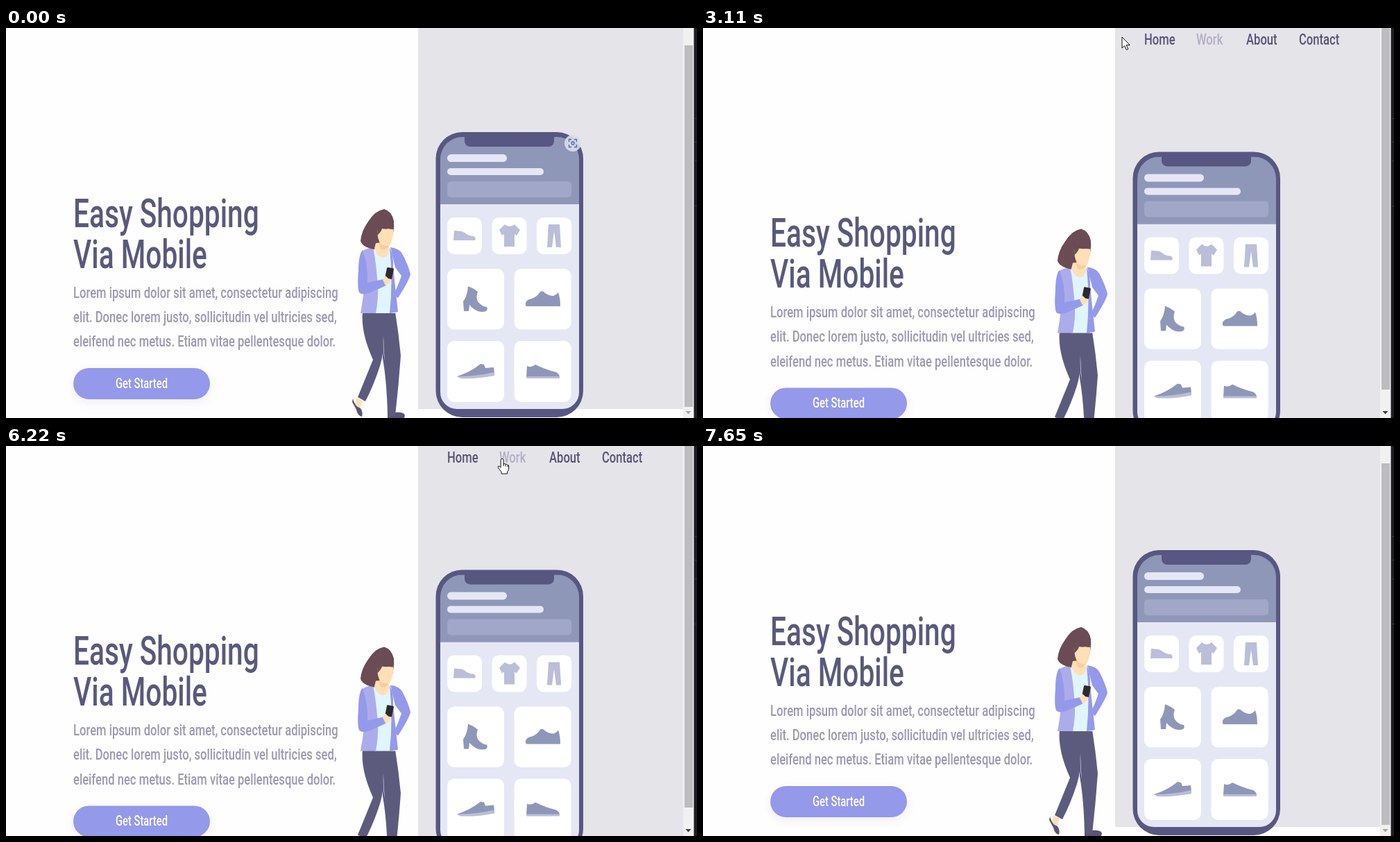
Write an HTML page with a canvas that moves like this. It is 996 by 562 pixels and loops after 8000 ms.

```html
<!DOCTYPE html>
<html lang="en">
<head>
<meta charset="utf-8">
<title>Easy Shopping</title>
<style>
  html, body { margin: 0; width: 100%; height: 100%; overflow: hidden; background: #fff; }
  canvas { display: block; width: 996px; height: 562px; }
</style>
</head>
<body>
<canvas id="stage" width="996" height="562"></canvas>
<script>
const LOOP = 8000;
const MAX_SCROLL = 28.4;
const CONDENSED = 0.755, HEADING_CONDENSED = 0.7;
const INK = '#59597d', SLATE = '#8f97b9', PALE = '#e5e7f5', MIST = '#babed8';
const VIOLET = '#9599ea', SKIN = '#ffdfb3', HAIR = '#6b4b54';
const g = document.getElementById('stage').getContext('2d');

const LINKS = [
  { label: 'Home', x: 636, w: 43 },
  { label: 'Work', x: 711, w: 40, active: true },
  { label: 'About', x: 783, w: 44 },
  { label: 'Contact', x: 859, w: 59 }
];

// Pointer moves: start, end, number of steps, then [progress, x, y] stops.
const MOVES = [
  { from: 790, to: 1480, steps: 11, path: [[0, 960, 270], [0.09, 919, 300], [0.4, 600, 390], [0.7, 300, 490], [1, 187, 532]] },
  { from: 1680, to: 1740, steps: 2, path: [[0, 187, 532], [1, 188, 526]] },
  { from: 2070, to: 2840, steps: 12, path: [[0, 188, 526], [0.35, 222, 480], [0.75, 307, 379], [1, 416, 292]] },
  { from: 2910, to: 3540, steps: 10, path: [[0, 416, 292], [0.4, 604, 13], [0.6, 630, 3], [0.8, 652, 12], [1, 672, 16]] },
  { from: 3940, to: 4210, steps: 5, path: [[0, 672, 16], [1, 747, 16]] },
  { from: 4680, to: 5010, steps: 5, path: [[0, 747, 16], [1, 806, 16]] },
  { from: 5270, to: 5480, steps: 4, path: [[0, 806, 16], [1, 886, 16]] },
  { from: 5940, to: 6700, steps: 12, path: [[0, 886, 16], [0.417, 715, 18], [0.58, 666, 20], [0.75, 676, 46], [1, 700, 85]] },
  { from: 6760, to: 7380, steps: 10, path: [[0, 700, 85], [0.2, 701, 90], [0.5, 790, 170], [1, 984, 290]] },
  { from: 7580, to: 7650, steps: 2, path: [[0, 984, 290], [1, 1010, 300]] }
];

const mix = (a, b, p) => a + (b - a) * p;

function along(path, p) {
  for (let i = 1; i < path.length; i++) {
    const a = path[i - 1], b = path[i];
    if (p <= b[0]) {
      const k = (p - a[0]) / (b[0] - a[0]);
      return { x: mix(a[1], b[1], k), y: mix(a[2], b[2], k) };
    }
  }
  const end = path[path.length - 1];
  return { x: end[1], y: end[2] };
}

function pointerAt(t) {
  const move = MOVES.filter(m => t >= m.from).pop();
  if (!move) return null;
  const u = Math.min(1, (t - move.from) / (move.to - move.from));
  const step = Math.floor(u * (move.steps - 1) + 0.2) + 1;
  return along(move.path, step / move.steps);
}

// Distance of the page from its lowest scroll position.
function scrollAt(t) {
  if (t < 2700 || t >= 6970) return 0;
  if (t < 2770) return 9;
  if (t < 2840) return 23;
  if (t < 6760) return MAX_SCROLL;
  if (t < 6830) return 21;
  return t < 6900 ? 10 : 2.5;
}

function rect(x, y, w, h, color, r = 0) {
  g.fillStyle = color;
  g.beginPath();
  g.roundRect(x, y, w, h, r);
  g.fill();
}

function shape(d, color, line) {
  const p = new Path2D(d);
  g.fillStyle = color;
  g.fill(p);
  if (line) {
    g.strokeStyle = line;
    g.lineWidth = 1;
    g.stroke(p);
  }
}

function text(str, x, y, size, color, align = 'left', condense = CONDENSED) {
  g.save();
  g.translate(x, y);
  g.scale(condense, 1);
  g.font = `500 ${size}px Roboto, "Open Sans", sans-serif`;
  g.textAlign = align;
  g.fillStyle = color;
  g.fillText(str, 0, 0);
  g.restore();
}

function drawCopy(hover) {
  text('Easy Shopping', 97, 287, 58, INK, 'left', HEADING_CONDENSED);
  text('Via Mobile', 97, 345.5, 58, INK, 'left', HEADING_CONDENSED);
  ['Lorem ipsum dolor sit amet, consectetur adipiscing',
   'elit. Donec lorem justo, sollicitudin vel ultricies sed,',
   'eleifend nec metus. Etiam vitae pellentesque dolor.'
  ].forEach((line, i) => text(line, 97, 388.5 + i * 35.3, 22, '#9d98b3'));
  g.save();
  g.shadowColor = 'rgba(90, 90, 160, 0.09)';
  g.shadowBlur = 14;
  g.shadowOffsetY = 5;
  rect(97, 490, 197, 45, hover ? '#9fa3ee' : VIOLET, 22.5);
  g.restore();
  text('Get Started', 195.5, 518.5, 19.5, '#fff', 'center');
}

function drawWoman() {
  // feet and trousers
  shape('M505 533L514 537L510 549L503 543Z M551 552H560V559H551Z', SKIN);
  shape('M500 534Q503 546 511 548Q515 554 513 560Q507 559 505 550L499 539Z M550 555Q556 558 561 554Q573 553 575 558L574 562H550Z', '#575478');
  shape('M514 409H561Q566 440 569 472Q566 515 561 559H550Q549 510 543 476Q543 462 544 447Q545 468 539 487Q530 515 518 538L507 532Q518 505 529 478Q511 438 514 409Z', '#5c5b7e');
  shape('M544 443Q543 462 546 480Q544 462 544 443Z', '#fff');
  // right arm and blouse
  shape('M554 316Q567 318 571 325Q580 342 583 355Q581 364 565 389L559 384Q565 372 570 357L561 345Z', VIOLET);
  shape('M559 382L564 389L560 391Q557 387 559 382Z', SKIN);
  shape('M529 317L555 318L563 411H531Z', '#e0f5fe');
  // jacket
  shape('M553 316Q559 328 558 345L565 409L553 411Q558 366 553 316Z', VIOLET);
  shape('M529 316Q513 319 511 325Q512 350 516 377Q514 395 511 411H533Q537 390 536 374Q534 340 529 316Z', '#acaceb');
  // head
  shape('M545 261Q532 263 522 279Q512 293 511 307Q514 316 531 319Q543 313 551 316Q561 295 559 278Q556 264 545 261Z', HAIR);
  shape('M533 310L552 308L552 320Q550 331 543 331Q534 328 531 318Z', SKIN);
  shape('M538 288Q549 292 558 287Q559 301 554 312Q546 317 540 312Q535 303 535 292Z', SKIN);
  shape('M537 309Q546 316 552 313Q549 321 540 319Z', '#f5cfa2');
  shape('M536 276L557 277L558 290Q549 290 543 284Q543 292 535 299Z', HAIR);
  // left arm with handset
  shape('M514 320Q508 327 508 350Q506 373 509 381Q514 386 526 381L548 371L544 362L521 367Q522 343 514 320Z', VIOLET);
  g.save();
  g.translate(552.5, 354);
  g.rotate(0.2);
  rect(-5, -8.5, 10, 17, '#2d2930', 1.5);
  g.restore();
  shape('M543 363L547 357L551 361L556 362Q554 369 547 371Z', SKIN);
}

function drawIcons() {
  shape('M646 292L657 293L661 295Q667 300 674 300Q678 302 676 306H645Z', MIST);
  shape('M719 283Q726 289 733 283L741 291L736 299L733 297V315H718V297L715 299L711 291Z', MIST);
  shape('M782 283H798L800 316H793L790 293L787 316H780Z', MIST);
  shape('M666 372Q674 375 680 380Q677 388 680 394Q685 401 693 402Q695 405 692 408Q686 410 680 408Q673 405 668 399L667 408H660L659 394Q665 386 666 372Z', SLATE);
  shape('M749 396Q751 391 758 390Q766 387 770 380Q774 378 777 382Q783 386 789 386Q793 385 796 381Q799 389 799 401H750Q748 399 749 396Z', SLATE);
  shape('M650 502Q669 496 684 484L689 485L691 490L703 489L704 498L655 504Z', SLATE);
  shape('M650 502Q679 502 704 496V501Q679 506 655 505Z', MIST);
  shape('M751 487Q757 490 763 485Q777 492 793 496Q798 499 798 503H750Z', SLATE);
  rect(750, 502, 48, 3, MIST, 1);
}

function drawPhone() {
  rect(619.5, 150, 212.5, 411, '#575782', 38);
  g.save();
  g.beginPath();
  g.roundRect(626, 157, 200, 392, [32, 32, 24, 24]);
  g.clip();
  rect(626, 157, 200, 97, SLATE);
  rect(626, 254, 200, 295, PALE);
  g.restore();
  rect(661, 155, 129, 16, '#575782', [0, 0, 8, 8]);
  rect(636, 182, 86, 11, PALE, 5.5);
  rect(636, 202, 139, 10, PALE, 5);
  rect(636, 221, 179, 23, '#a1a7c6', 5);
  for (const x of [636, 700.5, 765]) rect(x, 273, 50, 53, '#fff', 10);
  for (const x of [636, 732.5]) {
    rect(x, 347, 82, 87.5, '#fff', 10);
    rect(x, 451, 82, 88, '#fff', 10);
  }
  drawIcons();
}

function drawFocusButton() {
  rect(805, 154, 24, 24, 'rgba(220, 222, 232, 0.9)', 12);
  g.strokeStyle = '#4a68b8';
  g.lineWidth = 1.3;
  g.save();
  g.translate(817, 166);
  for (let i = 0; i < 4; i++) {
    g.beginPath();
    g.moveTo(-5.5, -2);
    g.lineTo(-5.5, -5.5);
    g.lineTo(-2, -5.5);
    g.stroke();
    g.rotate(Math.PI / 2);
  }
  g.beginPath();
  g.arc(0, 0, 2, 0, Math.PI * 2);
  g.stroke();
  g.restore();
}

function drawScrollbar(scroll, hover) {
  rect(976, 0, 16, 562, '#f1f1f2');
  rect(978, 25 * (1 - scroll / MAX_SCROLL), 12, 521, hover ? '#a6a6a8' : '#bdbdc0');
  shape('M979.5 552H987.5L983.5 556.5Z', scroll > 0 ? '#3c3c40' : '#a3a3a5');
  rect(991.5, 0, 4.5, 562, '#1d1d28');
  for (const y of [130, 164, 191, 256]) rect(993, y, 3, 1, '#3c3c48');
}

function drawPointer(p, kind) {
  g.save();
  g.translate(p.x, p.y);
  g.lineJoin = 'round';
  if (kind === 'hand') {
    shape('M-2 1.5Q0 -1 2 1.5V8Q4 6.5 5 8.5Q7 7.5 8 9.5Q10 9 9.5 12V15Q9 18 7.5 19V22H-1V19.5L-6 13Q-6 10.5 -4 11L-2 13Z', '#fff', '#111');
    shape('M2 8V11M5 8.5V11.5M8 9.5V12', 'transparent', '#111');
  } else if (kind === 'beam') {
    shape('M-3 -7H-1L0 -6L1 -7H3M0 -6V6M-3 7H-1L0 6L1 7H3', 'transparent', '#111');
  } else {
    shape('M0 0V16L3.7 12.5L6.3 18.5L8.8 17.4L6.2 11.6H11.2Z', '#fff', '#111');
  }
  g.restore();
}

function draw(t) {
  const scroll = scrollAt(t);
  const p = pointerAt(t);
  const over = (x, y, w, h) =>
    !!p && p.x >= x && p.x <= x + w && p.y - scroll >= y && p.y - scroll <= y + h;
  const onButton = over(97, 490, 197, 45);
  const onLink = l => over(l.x, -25, l.w, 24);
  const onCopy = over(97, 243, 265, 107) || over(97, 368, 383, 98);
  const onBar = !!p && p.x > 976 && p.x < 992;

  rect(0, 0, 996, 562, '#fefefe');
  g.save();
  g.translate(0, scroll);
  rect(594, -40, 382, 589, '#e5e4e9');
  for (const l of LINKS) {
    text(l.label, l.x, 23.5 - MAX_SCROLL, 22, l.active || onLink(l) ? '#b3aec3' : '#575379');
  }
  drawCopy(onButton);
  drawPhone();
  drawWoman();
  if (t < 1000) drawFocusButton();
  g.restore();
  drawScrollbar(scroll, onBar);
  if (p) {
    const kind = onButton || LINKS.some(onLink) ? 'hand' : onCopy ? 'beam' : 'arrow';
    drawPointer(p, kind);
  }
}

const start = performance.now();
function tick() {
  draw((performance.now() - start) % LOOP);
  requestAnimationFrame(tick);
}
tick();
</script>
</body>
</html>
```
